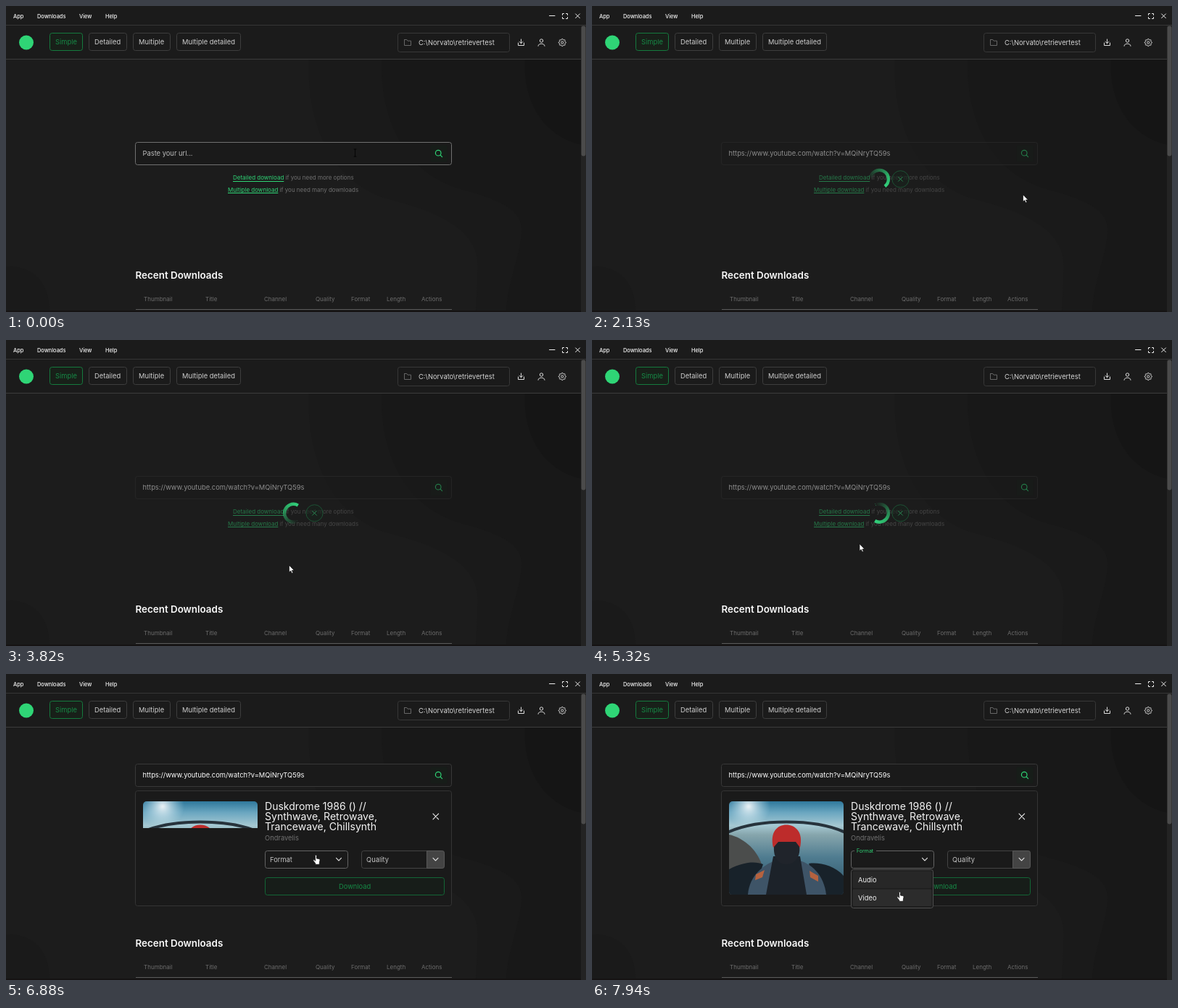
Write an HTML page with a canvas that moves like this. It is 800 px wide and 423 px high and loops after 8 s.

```html
<!DOCTYPE html>
<html lang="en">
<head>
<meta charset="utf-8">
<title>Downloader</title>
<style>
html, body { margin: 0; width: 100%; height: 100%; overflow: hidden; background: #1c1c1c; }
canvas { display: block; width: 800px; height: 423px; }
</style>
</head>
<body>
<canvas id="stage" width="800" height="423"></canvas>
<script>
const ctx = document.getElementById('stage').getContext('2d');
const LOOP = 8000, STEP = 62.5;
const PASTE = 800, LOADING = 1680, RESULT = 6250, THUMB_PART = 6870, THUMB_FULL = 6930, OPEN = 7250;
const GREEN = '#2fd576', DARK_GREEN = '#168a46';
const URL_TEXT = 'https://www.youtube.com/watch?v=MQiNryTQ59s';

// Pointer path: time, x, y
const POINTER = [
  [0, 481, 203], [310, 481, 203], [630, 474, 204], [1120, 474, 204], [1490, 596, 204],
  [1740, 596, 204], [2120, 594.5, 261], [2700, 520, 292], [3810, 390.5, 311.5],
  [5310, 369, 282], [6000, 369, 282], [6370, 412, 270], [6870, 412, 270],
  [6875, 427.5, 250.5], [7300, 427.5, 250.5], [7930, 424.5, 301.5], [8000, 424.5, 301.5]
];

function text(str, x, cy, size, color, weight = 400) {
  ctx.font = `${weight} ${size}px Inter, sans-serif`;
  ctx.fillStyle = color;
  ctx.fillText(str, x, Math.round(cy + size * 0.36));
  return ctx.measureText(str).width;
}

function box(x, y, w, h, stroke, fill, r = 3) {
  ctx.beginPath();
  ctx.roundRect(x + 0.5, y + 0.5, w, h, r);
  if (fill) { ctx.fillStyle = fill; ctx.fill(); }
  if (stroke) { ctx.lineWidth = 1; ctx.strokeStyle = stroke; ctx.stroke(); }
}

function rect(x, y, w, h, color) {
  ctx.fillStyle = color;
  ctx.fillRect(x, y, w, h);
}

function path(d, stroke, fill, width = 1, x = 0, y = 0) {
  ctx.save();
  ctx.translate(x, y);
  const p = new Path2D(d);
  if (fill) { ctx.fillStyle = fill; ctx.fill(p); }
  if (stroke) {
    ctx.lineWidth = width;
    ctx.lineCap = ctx.lineJoin = 'round';
    ctx.strokeStyle = stroke;
    ctx.stroke(p);
  }
  ctx.restore();
}

function disc(x, y, r, fill, stroke, width = 1) {
  ctx.beginPath();
  ctx.arc(x, y, r, 0, Math.PI * 2);
  if (fill) { ctx.fillStyle = fill; ctx.fill(); }
  if (stroke) { ctx.strokeStyle = stroke; ctx.lineWidth = width; ctx.stroke(); }
}

function cross(x, y, r, color, width = 1) {
  path(`M${-r} ${-r}L${r} ${r}M${r} ${-r}L${-r} ${r}`, color, null, width, x, y);
}

const chevron = (x, y) => path('M-3.5 -2L0 1.7L3.5 -2', '#ddd', null, 1.1, x, y);

function background() {
  rect(0, 0, 800, 423, '#1c1c1c');
  path('M418 73C414 150 440 235 520 265C600 285 651 310 651 360L648 423H800V73Z', null, '#1a1a1a');
  path('M518 73C516 150 545 225 620 251C680 268 715 280 711 315C708 350 692 380 690 423H800V73Z', null, '#181818');
  path('M716 73C712 135 745 185 800 193V73Z', null, '#151515');
  path('M0 360C40 358 60 385 60 423H0Z', null, '#1a1a1a');
}

function header() {
  rect(0, 0, 800, 73, '#1b1b1b');
  rect(0, 26, 800, 1, '#363636');
  rect(0, 73, 793, 1, '#3c3c3c');
  [['App', 10], ['Downloads', 43], ['View', 101], ['Help', 137]]
    .forEach(([label, x]) => text(label, x, 14, 7.4, '#f6f6f6', 500));
  path('M749.5 13.5H757', '#eee');
  path('M767.5 12.5V10.5H769.5M772.5 10.5H774.5V12.5M774.5 15.5V17.5H772.5M769.5 17.5H767.5V15.5', '#eee');
  cross(788.5, 13.8, 2.9, '#eee');

  disc(28, 50.5, 10, GREEN);
  [['Simple', 60, 45], ['Detailed', 114, 52], ['Multiple', 175, 51], ['Multiple detailed', 235, 88]]
    .forEach(([label, x, w], i) => {
      box(x, 37, w, 24, i ? '#3e3e3e' : '#157a3e', i ? '#1b1b1b' : '#182019');
      text(label, x + 8, 49.5, 9.35, i ? '#cfcfcf' : DARK_GREEN);
    });

  box(540, 37, 154, 26, '#383838', '#1a1a1a');
  path('M549.5 47V54.5H558.5V48.2H554L552.8 46.5H549.5Z', '#666');
  text('C:\\Norvato\\retrievertest', 569, 50.5, 9.35, '#d4d4d4');

  path('M706.5 51V54.5H714.5V51M710.5 46V51.5M708 49.3L710.5 51.7L713 49.3', '#ddd');
  disc(738.5, 48, 2.2, null, '#ddd');
  path('M734 55.3C734 51 743 51 743 55.3', '#ddd');
  disc(767.3, 50.5, 1.6, null, '#ddd');
  ctx.beginPath();
  for (let i = 0; i <= 64; i++) {
    const a = i / 64 * Math.PI * 2;
    const r = 4.5 + 0.6 * Math.tanh(3 * Math.cos(8 * a));
    ctx.lineTo(767.3 + r * Math.cos(a), 50.5 + r * Math.sin(a));
  }
  ctx.stroke();

  rect(793, 27, 7, 396, '#232323');
  box(793, 27, 6, 180, null, '#4b4b4b', 3);
}

function recent() {
  text('Recent Downloads', 178.5, 372, 13.4, '#fafafa', 600);
  [['Thumbnail', 190], ['Title', 275], ['Channel', 356], ['Quality', 427], ['Format', 476], ['Length', 525], ['Actions', 573]]
    .forEach(([label, x]) => text(label, x, 405, 8, '#6c6c6c'));
  rect(179, 419, 436, 1, '#5a5a5a');
  rect(0, 421, 793, 2, '#151313');
}

function searchBar(y, t, border) {
  const pasted = t >= PASTE;
  box(178, y, 436, 31, border, '#1a1a1a');
  box(585, y + 4, 23, 23, null, '#171d19', 2);
  disc(596.2, y + 15.2, 3.8, null, GREEN, 1.2);
  path('M599.1 18.1L601.6 20.6', GREEN, null, 1.2, 0, y);
  const w = text(pasted ? URL_TEXT : 'Paste your url...', 188.5, y + 16, 9.35, pasted ? '#fff' : '#bdbdbd');
  if (pasted && t < LOADING) rect(Math.round(188.5 + w), y + 10, 1, 12, '#eee');
}

function hints() {
  [['Detailed download', ' if you need more options', 313, 237.5], ['Multiple download', ' if you need many downloads', 306, 254]]
    .forEach(([link, rest, x, y]) => {
      const w = text(link, x, y, 8, GREEN);
      rect(x, Math.round(y + 4), w, 1, GREEN);
      text(rest, x + w, y, 8, '#6f6f6f');
    });
}

function spinner(t) {
  const cx = 396.5, cy = 239.3, sweep = 235 / 360;
  const head = (t / 1000 + 8 / 360) * Math.PI * 2;
  const tail = head - sweep * Math.PI * 2;
  const fade = ctx.createConicGradient(tail, cx, cy);
  fade.addColorStop(0, 'rgba(47,200,115,0)');
  fade.addColorStop(sweep * 0.7, 'rgba(47,205,118,.85)');
  fade.addColorStop(sweep, '#32d07c');
  fade.addColorStop(1, '#32d07c');
  ctx.beginPath();
  ctx.arc(cx, cy, 12.4, tail, head);
  ctx.lineWidth = 4.4;
  ctx.lineCap = 'butt';
  ctx.strokeStyle = fade;
  ctx.stroke();
  disc(425.5, 239.3, 11.6, 'rgba(24,36,29,.55)', '#1d5134');
  cross(425.5, 239.3, 3, '#26834f');
}

function photo(height) {
  ctx.save();
  ctx.beginPath();
  ctx.roundRect(189, 176, 158, height, height < 129 ? [5, 5, 0, 0] : 5);
  ctx.clip();
  const sky = ctx.createLinearGradient(0, 176, 0, 305);
  [[0, '#2f789c'], [0.12, '#6aa6c0'], [0.26, '#a5c8d2'], [0.36, '#86a5ac'], [0.6, '#4f7c90'], [1, '#2b4f62']]
    .forEach(([at, color]) => sky.addColorStop(at, color));
  rect(189, 176, 158, 129, sky);
  const sun = ctx.createRadialGradient(216, 183, 1, 216, 183, 30);
  sun.addColorStop(0, 'rgba(255,255,255,.85)');
  sun.addColorStop(1, 'rgba(200,230,240,0)');
  rect(189, 176, 158, 129, sun);
  path('M187 219C215 206 245 204.5 268 204.5S322 206 349 219', '#27333c', null, 4);
  path('M189 222C207 226 226 240 234 263L214 305H189Z', null, '#4b4d4c');
  path('M189 270C210 259 226 259 236 263L222 305H189ZM347 279C334 264 313 260 299 262L314 305H347Z', null, '#18222a');
  path('M215 305C217 278 238 262 256 257H282C303 261 320 278 323 305Z', null, '#3e5467');
  path('M250 252L240 305H296L287 252Z', null, '#1c2229');
  path('M226 277L238 271L235 281L225 285ZM300 272L312 279V287L301 281Z', null, '#b5623f');
  path('M252 232C248 250 255 263 268 263S290 250 285 232Z', null, '#20242b');
  path('M250 240C245 218 256 208.5 268 208.5S292 218 287 240L281 232H257Z', null, '#bd2c2b');
  ctx.restore();
}

function card(t) {
  const open = t >= OPEN, hover = t >= THUMB_PART;
  box(178, 161, 436, 159, '#343434', '#1a1a1a');
  if (hover) photo(t < THUMB_FULL ? 37 : 129.5);
  ['Duskdrome 1986 () //', 'Synthwave, Retrowave,', 'Trancewave, Chillsynth']
    .forEach((line, i) => text(line, 357, 182.5 + i * 14.2, 14.05, '#f4f4f4'));
  text('Ondravelis', 357, 227, 9.35, '#727272');
  cross(592.8, 197, 3.8, '#eee', 1.1);

  box(357, 244, 114, 24, hover ? '#636363' : '#444', '#1a1a1a');
  chevron(459, 256.3);
  box(490, 244, 114, 24, '#444', '#1a1a1a');
  box(580, 244, 24, 24, '#585858', '#444', [0, 3, 3, 0]);
  chevron(592.5, 256.3);
  text('Quality', 497, 256.5, 9.35, '#c4c4c4');
  box(357, 281, 247, 24, '#136636', '#171d19');
  text('Download', 459, 293.5, 9.35, DARK_GREEN);

  if (!open) {
    text('Format', 364, 256.5, 9.35, '#c4c4c4');
    return;
  }
  rect(362, 243, 30, 3, '#1a1a1a');
  text('Format', 365, 244, 7, GREEN);
  box(357, 270, 113, 53, '#505050', '#1d1d1d');
  const overVideo = t > 7750;
  [['Audio', 272], ['Video', 297]].forEach(([label, y], i) => {
    box(359, y, 109, 23.5, null, i && overVideo ? '#2c2c2c' : '#272727', 2);
    text(label, 367, y + 12.3, 9.35, '#f0f0f0');
  });
}

function pointer(t) {
  const i = POINTER.findIndex((k, n) => n && t < k[0]);
  const [t0, x0, y0] = POINTER[i - 1], [t1, x1, y1] = POINTER[i];
  const u = (t - t0) / (t1 - t0), e = u * u * (3 - 2 * u);
  const x = x0 + (x1 - x0) * e, y = y0 + (y1 - y0) * e;
  const overField = t < LOADING && x < 585;
  const overButton = t < LOADING || t >= THUMB_PART;
  if (overField) {
    path('M-1.5 -5H1.5M0 -5V5M-1.5 5H1.5', '#050505', null, 1, x + 0.5, y);
  } else if (overButton) {
    path('M-1 .8C-1 -.5 1 -.5 1 .8V4.5L4 5C5.3 5.3 5.6 6 5.5 7L4.8 11V12.8H-.8V11.2L-3.5 7.8C-4.3 6.6 -3 5.7 -2 6.6L-1 7.6Z',
      '#111', '#fff', 0.8, x, y);
  } else {
    path('M0 0V9.6L2.2 7.6L3.8 11L5.4 10.3L3.9 7H6.8Z', '#111', '#fff', 0.7, x, y);
  }
}

function draw(now) {
  const t = Math.floor(now % LOOP / STEP) * STEP;
  const done = t >= RESULT, loading = t >= LOADING && !done;
  background();
  header();
  recent();
  ctx.globalAlpha = loading ? 0.5 : 1;
  searchBar(done ? 124 : 188, t, done ? '#383838' : loading ? '#303030' : '#707070');
  if (!done) hints();
  ctx.globalAlpha = 1;
  if (loading) spinner(t);
  if (done) card(t);
  pointer(t);
}

const start = performance.now();
function tick() {
  draw(performance.now() - start);
  requestAnimationFrame(tick);
}
tick();
</script>
</body>
</html>
```
